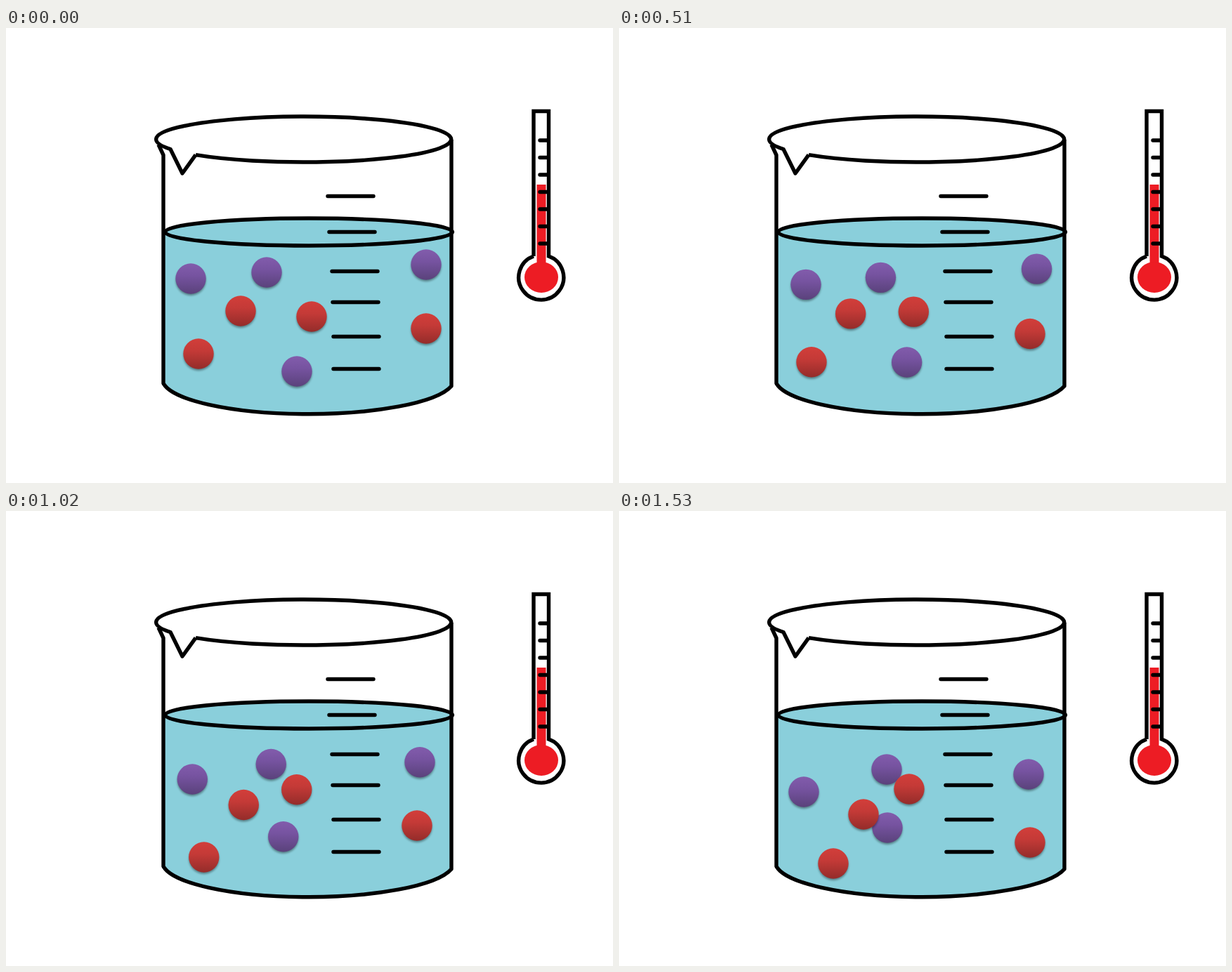
An HTML page for the animation above (1700 ms loop, 864x648 px).

```html
<!DOCTYPE html>
<html lang="en">
<head>
<meta charset="utf-8">
<title>Particles in a beaker</title>
<style>
html, body { margin: 0; width: 100%; height: 100%; overflow: hidden; background: #fff; }
svg { display: block; width: 100%; height: 100%; }
.ink { fill: none; stroke: #000; stroke-width: 5.4; stroke-linejoin: round; }
.tick { stroke-linecap: round; }
</style>
</head>
<body>
<svg viewBox="0 0 864 648">
  <defs>
    <linearGradient id="purple" x2="0" y2="1">
      <stop offset="0" stop-color="#825cac"/>
      <stop offset=".4" stop-color="#7653a0"/>
      <stop offset="1" stop-color="#5a427b"/>
    </linearGradient>
    <linearGradient id="red" x2="0" y2="1">
      <stop offset="0" stop-color="#d23e3a"/>
      <stop offset=".4" stop-color="#c43a37"/>
      <stop offset="1" stop-color="#942c2a"/>
    </linearGradient>
    <filter id="soft" x="-30%" y="-30%" width="160%" height="160%">
      <feGaussianBlur stdDeviation="1.4"/>
    </filter>
  </defs>

  <path fill="#8acfdb" d="M224 290.5A206 20 0 0 1 634 290.5V510A208 50 0 0 1 224 506Z"/>
  <g class="ink">
    <path d="M270 180.7A210 32.5 0 1 0 234 172.5L251 207L270 180.7"/>
    <path d="M217 166L224 181V506A208 50 0 0 0 634 510V159"/>
    <ellipse cx="431" cy="290.5" rx="204.5" ry="19.5"/>
    <path id="marks" class="tick"/>
  </g>

  <path class="ink" style="stroke-linejoin:miter" d="M751 325V118.5H772.5V325A32 32 0 1 1 751 325"/>
  <path fill="#ed1c24" d="M755.5 223H768.5V340H755.5Z"/>
  <ellipse cx="762" cy="355" rx="24" ry="22" fill="#ed1c24"/>
  <path id="degrees" class="ink tick"/>

  <g id="balls"></g>
</svg>
<script>
const STEP = 170, STEPS = 10;

// Balls drift, linger before a kick, then drift on; one point per turn.
const turns = [0, 2, 5, 9];
const eases = [f => f, f => f * f, f => f];
const balls = [
  ["purple", [263, 357], [266, 364], [266, 376], [263, 400]],
  ["purple", [371, 348], [372, 355], [376, 358], [381, 368]],
  ["purple", [598, 337], [595, 342], [591, 352], [583, 375]],
  ["purple", [414, 489], [411, 477], [399, 468], [382, 451]],
  ["red", [334, 403], [329, 406], [335, 414], [348, 432]],
  ["red", [435, 411], [420, 405], [414, 397], [413, 396]],
  ["red", [598, 428], [585, 435], [585, 440], [585, 472]],
  ["red", [274, 464], [274, 474], [274, 490], [305, 502]]
];

const $ = id => document.getElementById(id);
const dashes = (points, length) =>
  points.map(([x, y]) => `M${x} ${y}h${length}`).join("");

$("marks").setAttribute("d", dashes([
  [458, 239.5], [460, 290.5], [464, 346.5],
  [465, 390.5], [466, 439.5], [466, 485.5]
], 65));
$("degrees").setAttribute("d", dashes(
  Array.from({ length: 7 }, (_, i) => [760, 160 + i * 24.5]), 10
));

$("balls").innerHTML = balls.map(([color]) => `<g>
  <circle cy="2.5" r="21.5" opacity=".38" filter="url(#soft)"/>
  <circle r="21.7" fill="url(#${color})"/></g>`).join("");
const nodes = [...$("balls").children];

function draw(ms) {
  const step = Math.floor(ms / STEP) % STEPS;
  const leg = Math.min(turns.findLastIndex(t => t <= step), eases.length - 1);
  const f = eases[leg]((step - turns[leg]) / (turns[leg + 1] - turns[leg]));
  balls.forEach(([, ...path], n) => {
    const [from, to] = path.slice(leg, leg + 2);
    const spot = from.map((v, axis) => v + (to[axis] - v) * f);
    nodes[n].setAttribute("transform", `translate(${spot})`);
  });
}

const start = performance.now();
function tick() {
  draw(performance.now() - start);
  requestAnimationFrame(tick);
}
tick();
</script>
</body>
</html>
```
